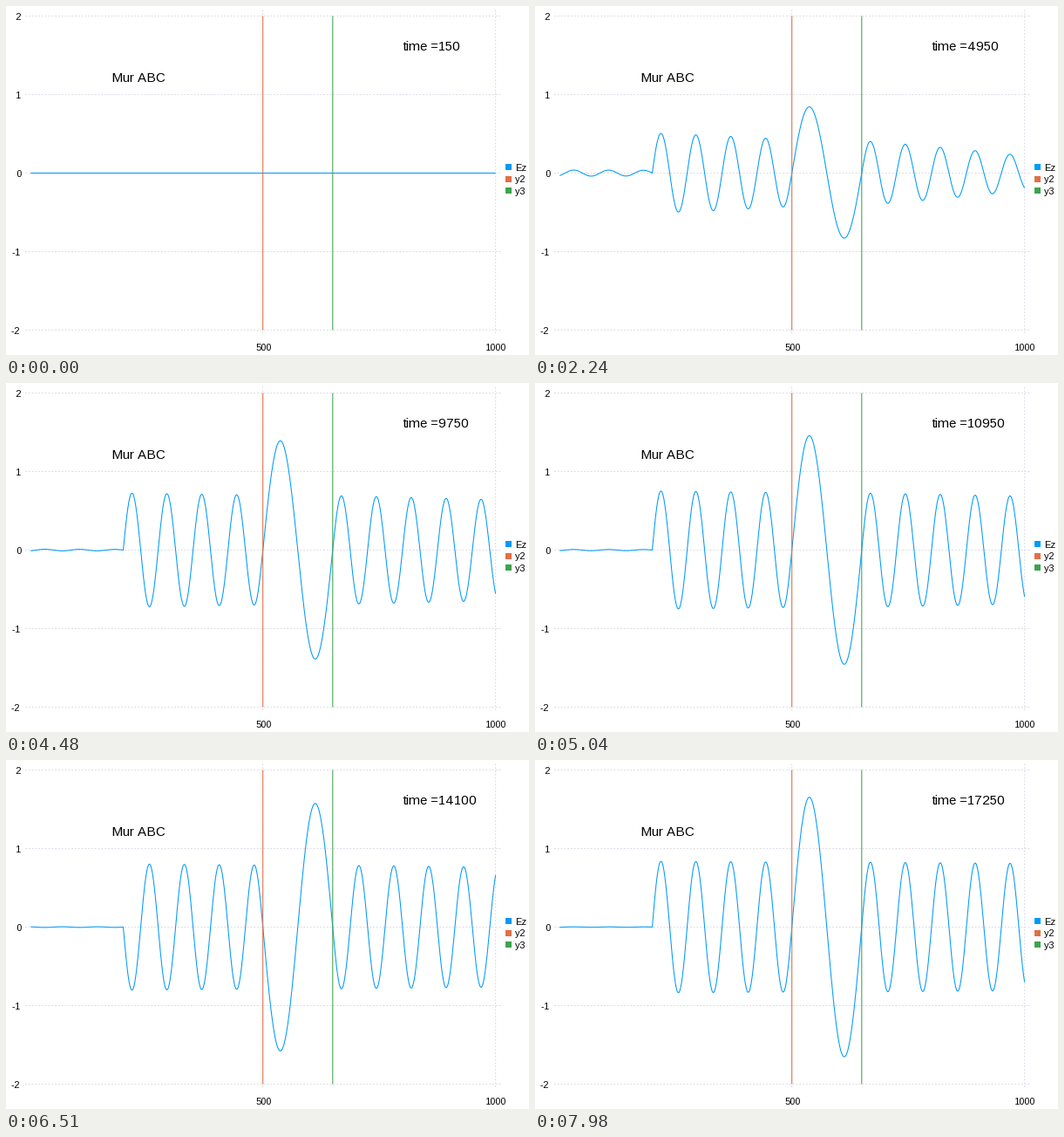
Write a matplotlib script that moves like this. It is 600x400 px and loops after 8000 ms.

```python
import numpy as np
import matplotlib.pyplot as plt
from matplotlib.animation import FuncAnimation
from matplotlib.patches import Rectangle

plt.rcParams["font.family"] = "Liberation Sans"
plt.rcParams["text.hinting_factor"] = 1
plt.rcParams["axes.unicode_minus"] = False

DPI = 100
PT = 72 / DPI              # points per pixel
TICK_MS, STEP_MS, LOOP_MS = 10, 70, 8000
STEP = 150                 # solver steps between pictures
PERIOD, RAMP = 300, 3000   # source period and switch-on time, in solver steps
SOURCE, LEFT, RIGHT = 200, 500, 650
BLUE, ORANGE, GREEN = "#009AFA", "#E26F46", "#3DA44D"

cells = np.arange(1, 1001)


def px(x):
    return 27.7 + 0.534 * x


def py(y):
    return 191.5 - 90 * y


def wave(t):
    """Source signal: a sine that swells slowly."""
    t = np.maximum(t, 1.0)
    return np.sin(2 * np.pi * t / PERIOD) * np.exp(-RAMP / t)


def field(t, bounces=6):
    """Wave through a slab of half the index: sum of all internal bounces."""
    slow, fast = 4, 2                     # solver steps per cell
    enter = slow * (LEFT - SOURCE)
    cross = fast * (RIGHT - LEFT)
    before, after = cells < LEFT, cells > RIGHT
    slab = ~before & ~after
    ez = np.zeros(len(cells))

    x = cells[before]
    back = t - enter - slow * (LEFT - x)
    ez[before] = np.where(x >= SOURCE, wave(t - slow * (x - SOURCE)), 0)
    ez[before] += wave(back) / 3

    depth = fast * (cells[slab] - LEFT)
    beyond = slow * (cells[after] - RIGHT)
    for n in range(bounces):
        gain = (1 / 9) ** n
        late = t - enter - 2 * cross * n
        ez[before] -= 8 / 27 * gain * wave(back - 2 * cross * (n + 1))
        ez[slab] += 4 / 3 * gain * (wave(late - depth)
                                    - wave(late - 2 * cross + depth) / 3)
        ez[after] += 8 / 9 * gain * wave(late - cross - beyond)
    return ez


fig = plt.figure(figsize=(6, 4), dpi=DPI, facecolor="white")
ax = fig.add_axes([0, 0, 1, 1])
ax.set_xlim(0, 600)
ax.set_ylim(400, 0)
ax.axis("off")


def line(xs, ys, color, width=1.05, **kw):
    return ax.plot(xs, ys, color=color, lw=width * PT, snap=False,
                   solid_capstyle="butt", **kw)[0]


def label(x, y, text, size=8, ha="left"):
    return ax.text(x, y, text, fontsize=size * 96 / DPI * 0.75 * 100 / 75 * PT / 0.72
                   if False else size * 96 / DPI, ha=ha, va="baseline",
                   color="black")


def grid(xs, ys):
    line(xs, ys, "#D0D0E0", 0.76, linestyle=(0, (2.5, 2.5)),
         dash_capstyle="butt")


for v in range(-2, 3):
    grid([22, 567.5], [py(v)] * 2)
    label(17, round(py(v) + 4.4), str(v), ha="right")
for v, left in ((500, 286), (1000, 550)):
    grid([px(v)] * 2, [4.5, 377])
    label(left, 395, str(v))

curve = line(px(cells), py(0 * cells), BLUE)
line([px(LEFT)] * 2, [py(2), py(-2)], ORANGE)
line([px(RIGHT)] * 2, [py(2), py(-2)], GREEN)

for i, (name, color) in enumerate((("Ez", BLUE), ("y2", ORANGE), ("y3", GREEN))):
    mid = 184.5 + 13.7 * i
    ax.add_patch(Rectangle((573, mid - 3.5), 7, 7, color=color, lw=0))
    label(584, round(mid + 4.3), name)

label(121, 87, "Mur ABC", 11)
clock = label(455, 51, "", 11)


def draw(i):
    t = STEP * (1 + i * TICK_MS // STEP_MS)
    curve.set_ydata(py(field(t)))
    clock.set_text(f"time ={t}")
    return curve, clock


anim = FuncAnimation(fig, draw, frames=LOOP_MS // TICK_MS, interval=TICK_MS,
                     repeat=True, repeat_delay=0)
plt.show()
```
